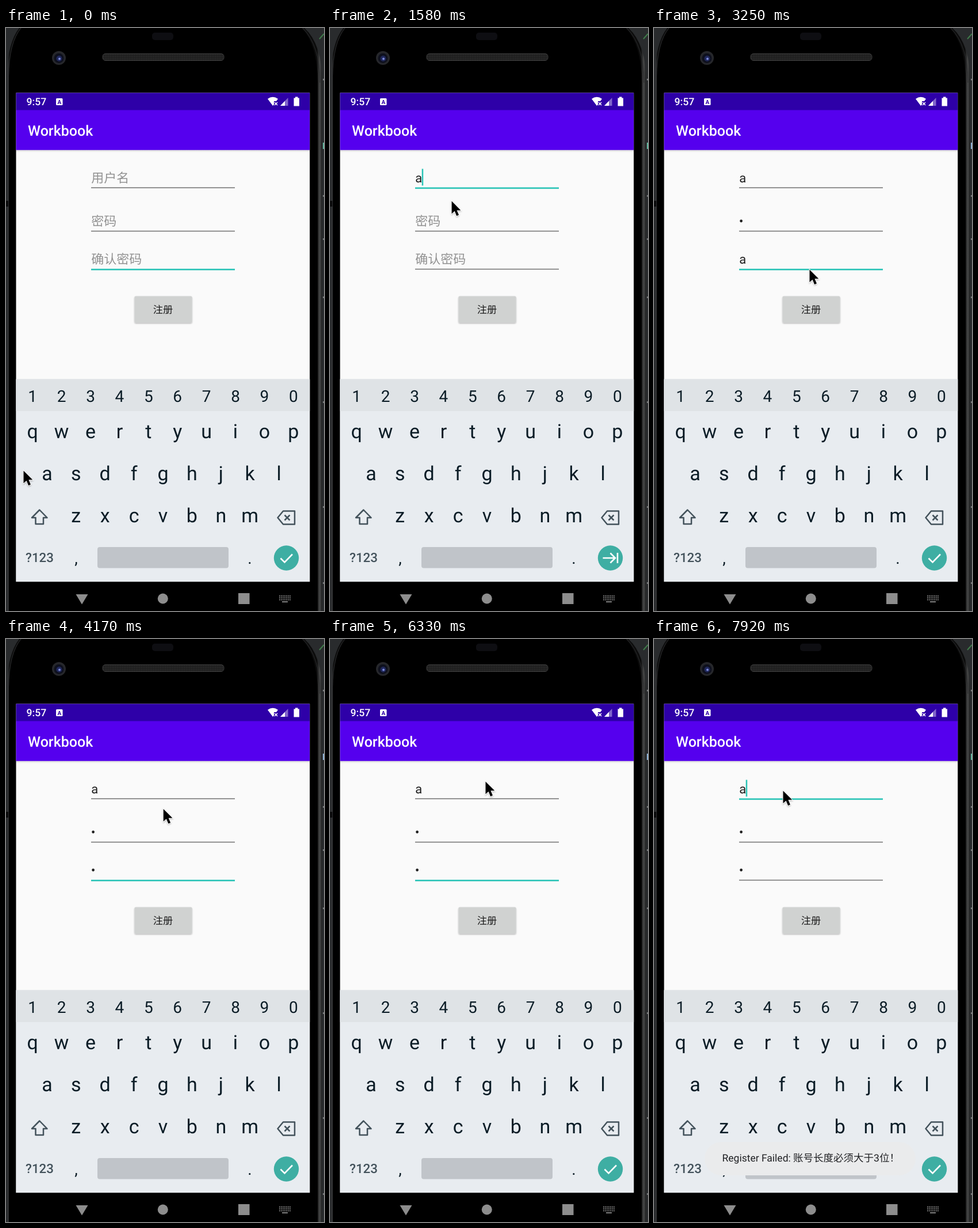
Animation, 553 px wide and 1012 px high, one loop 8 s. Source, as an HTML page:

```html
<!DOCTYPE html>
<html lang="zh-CN">
<head>
<meta charset="utf-8">
<title>Sign-up form</title>
<style>
html, body { margin: 0; width: 100%; height: 100%; overflow: hidden; background: #000; }
svg { display: block; width: 100%; height: 100%; }
text { font-family: Roboto, "Noto Sans CJK SC", "Noto Sans CJK", sans-serif; white-space: pre; text-rendering: geometricPrecision; }
.hint { fill: #929292; font-size: 22px; }
.value { fill: #212121; font-size: 22px; }
.digit { font-size: 28px; }
.letter { font-size: 34px; }
.digit, .letter { fill: #0b1c26; text-anchor: middle; }
.icon { fill: none; stroke: #43525b; stroke-width: 2.5; stroke-linejoin: round; }
.mark { fill: none; stroke: #fff; stroke-width: 2.6; }
</style>
</head>
<body>
<svg viewBox="0 0 553 1012" preserveAspectRatio="none">
  <defs>
    <linearGradient id="rim">
      <stop offset="0" stop-color="#222326"/><stop offset=".004" stop-color="#37383a"/>
      <stop offset=".009" stop-color="#0c0c0c"/><stop offset=".983" stop-color="#0c0c0c"/>
      <stop offset=".992" stop-color="#484949"/><stop offset="1" stop-color="#1c1d1e"/>
    </linearGradient>
    <linearGradient id="barShade" x2="0" y2="1">
      <stop offset="0" stop-color="#000" stop-opacity=".14"/><stop offset="1" stop-color="#000" stop-opacity="0"/>
    </linearGradient>
    <pattern id="mesh" width="3" height="3" patternUnits="userSpaceOnUse">
      <rect width="3" height="3" fill="#1d1d1d"/><circle cx="1.5" cy="1.5" r=".8" fill="#3a3a3a"/>
    </pattern>
    <filter id="soft" x="-30%" y="-30%" width="160%" height="170%">
      <feDropShadow dx="0" dy="1.3" stdDeviation="1.3" flood-opacity=".32"/>
    </filter>
  </defs>

  <!-- phone body -->
  <rect width="553" height="1012" fill="#292b2d"/>
  <path d="M1 1012V85Q3 25 23 0H519Q550 28 550 95V1012z" fill="url(#rim)"/>
  <path d="M5 1012V85Q6 26 27 0H514Q542 28 542 95V1012z" fill="#000"/>
  <path d="M4.500 1012V85Q5 25 26 0M516 0Q546 30 546 95" fill="none" stroke="#2b2c2e"/>
  <path d="M0 300H4V310H0z" fill="#0b0b0c"/>
  <g id="edge"></g>
  <path d="M545 19L553 10" stroke="#3f7c4a" stroke-width="2"/>
  <rect id="tick" x="551" y="199" width="2" height="11"/>

  <rect x="254" y="8" width="37" height="13" rx="5" fill="#0e0e12"/>
  <rect x="168" y="44.500" width="211" height="12" rx="5" fill="url(#mesh)" stroke="#3d3d3d"/>
  <circle cx="92" cy="52" r="12" fill="#26272b"/>
  <circle cx="92" cy="52.500" r="8.500" fill="#0e101d"/>
  <circle cx="92.500" cy="53" r="5" fill="#20285a"/>
  <circle cx="93" cy="53.500" r="2" fill="#7c8bdc"/>

  <!-- status and title bars -->
  <rect x="17.500" y="112.500" width="510.700" height="849" fill="#fafafa"/>
  <rect x="17.500" y="112.500" width="510.700" height="30.500" fill="#2e00a8"/>
  <rect x="17.500" y="142.500" width="510.700" height="69.300" fill="#5500ee"/>
  <rect x="17.500" y="211.800" width="510.700" height="4" fill="url(#barShade)"/>
  <g fill="#fff">
    <text x="35.500" y="134.300" font-size="17.600" font-weight="500">9:57</text>
    <rect x="87" y="122" width="11.500" height="12" rx="1.500"/>
    <text x="92.800" y="131.800" font-size="10" font-weight="700" text-anchor="middle" fill="#2e00a8">A</text>
    <path d="M455 123Q464 116.500 473 123L470 127H466V133L464 135z"/>
    <path d="M467 129L472 134M472 129L467 134" stroke="#fff" stroke-width="1.500"/>
    <path d="M477 135L490.500 121V135z" opacity=".4"/>
    <path d="M477 135L485 126.700V135z"/>
    <path d="M500.500 121.500H503V119.500H507.500V121.500H510V135.500H500.500z"/>
    <text x="38" y="187" font-size="25" font-weight="500">Workbook</text>
  </g>

  <g id="fields"></g>
  <rect id="caret" width="2.500" height="29" fill="#28c3b6"/>
  <rect id="button" x="223.500" y="465.500" width="100" height="46" rx="2" filter="url(#soft)"/>
  <text x="273" y="495" font-size="17.200" fill="#1b1b1b" text-anchor="middle">注册</text>

  <!-- keyboard -->
  <rect x="17.500" y="609.500" width="510.700" height="352" fill="#e8ecf0"/>
  <rect x="17.500" y="609.500" width="510.700" height="55.500" fill="#dfe3e6"/>
  <g id="keys"></g>
  <path class="icon" d="M58.300 836.500L71.500 850H65V861H51.500V850H45z"/>
  <path class="icon" d="M482 838.500H502V861.500H482L472.500 850zM484.500 845.500L493.500 854.500M493.500 845.500L484.500 854.500"/>
  <text x="58.500" y="927" font-size="22.300" font-weight="500" fill="#43525b" text-anchor="middle">?123</text>
  <rect x="159" y="901" width="228" height="36.500" rx="4" fill="#c0c4c9"/>
  <circle cx="487.500" cy="920" r="21.700" fill="#3eaea3"/>
  <path id="done" class="mark" d="M477.500 920.500L484.500 927.500L498 913.500"/>
  <path id="next" class="mark" d="M474.500 920H496M487.500 911.500L496 920L487.500 928.500M500 911V929"/>

  <g id="toast">
    <rect x="88" y="873" width="367" height="58" rx="29" fill="#eaebec"/>
    <text x="118.500" y="907.300" font-size="17.500" fill="#202124">Register Failed: 账号长度必须大于3位！</text>
  </g>

  <!-- navigation bar -->
  <rect x="17" y="961.300" width="512" height="50.700" fill="#000"/>
  <g fill="#8d8d8d">
    <path d="M121.500 983H142.500L132 1000.500z"/>
    <circle cx="272.800" cy="990.500" r="9"/>
    <rect x="404" y="981" width="19.500" height="19"/>
    <g id="dots"></g>
  </g>

  <path id="pointer" d="M0 0V23.500L5.500 18.500L9.300 27.600L13.400 25.800L9.600 17H17z"
    fill="#000" stroke="#fff" stroke-width="1.800" paint-order="stroke" filter="url(#soft)"/>
</svg>
<script>
const LOOP = 8000;
const $ = id => document.getElementById(id);

function add(parent, tag, attrs, label) {
  const node = document.createElementNS("http://www.w3.org/2000/svg", tag);
  for (const key in attrs) node.setAttribute(key, attrs[key]);
  if (label) node.textContent = label;
  return parent.appendChild(node);
}

const show = (node, visible) => node.setAttribute("visibility", visible ? "visible" : "hidden");
const clamp = v => Math.max(0, Math.min(1, v));

// every keyboard row is centred: characters, baseline, class
const PITCH = 50.4;
[["1234567890", 649, "digit"], ["qwertyuiop", 712, "letter"],
 ["asdfghjkl", 785, "letter"], ["zxcvbnm", 858, "letter"]]
  .forEach(([row, y, cls]) => [...row].forEach((c, i) =>
    add($("keys"), "text", { x: 273 + (i - (row.length - 1) / 2) * PITCH, y, class: cls }, c)));
[[",", 122], [".", 424]].forEach(([c, x]) =>
  add($("keys"), "text", { x, y: 930, class: "digit" }, c));

for (let i = 0; i < 21; i++)
  add($("dots"), "rect", { x: 475 + i % 7 * 3, y: 985 + Math.floor(i / 7) * 3.3, width: 1.8, height: 1.8 });
add($("dots"), "rect", { x: 480, y: 995.2, width: 10, height: 1.8 });

[88, 290, 365, 466, 648, 830, 962].forEach(y =>
  add($("edge"), "rect", { x: 551, y, width: 2, height: 3, fill: "#77797a" }));

const fields = [["用户名", 260], ["密码", 335.3], ["确认密码", 401.3]].map(([label, mid]) => {
  const g = $("fields");
  return {
    mid,
    hint: add(g, "text", { x: 148.3, y: mid + 8, class: "hint" }, label),
    value: add(g, "text", { x: 148.3, y: mid + 7.7, class: "value" }, "a"),
    dot: add(g, "circle", { cx: 151.6, cy: mid - .3, r: 2.4, fill: "#212121" }),
    line: add(g, "rect", { x: 148, width: 250 })
  };
});

// pointer stops: time, x, y
const stops = [
  [80, 30, 767], [760, 209, 256], [1400, 209, 256], [1750, 213, 338], [2050, 213, 338],
  [2250, 220, 378], [2500, 220, 392], [2750, 268, 470], [2920, 268, 470], [3250, 270, 418],
  [3670, 273, 335], [3750, 274, 325], [3920, 274, 325], [4500, 272, 246], [5450, 272, 246],
  [5580, 270, 246], [6330, 270, 246], [6560, 274, 478], [6900, 274, 478], [7500, 224, 262]
];

function pointerAt(t) {
  const i = stops.findIndex(s => s[0] > t);
  if (i === 0) return stops[0].slice(1);
  if (i < 0) return stops[stops.length - 1].slice(1);
  const [a, b] = [stops[i - 1], stops[i]];
  const u = (t - a[0]) / (b[0] - a[0]);
  const e = u * u * (3 - 2 * u);
  return [1, 2].map(k => a[k] + (b[k] - a[k]) * e);
}

// focus changes: time, field index
const focusTimes = [[0, 2], [800, 0], [1750, 1], [2330, 2], [7830, 0]];
const caretResets = [-500, 800, 1250, 1750, 2080, 2330, 2420, 7830];
const typedAt = [1250, 2080, 2420];
const maskedAt = [Infinity, 2420, 3920];
const lastBefore = (list, t) => list.filter(v => v <= t).pop();

function draw(t) {
  const focus = focusTimes.filter(f => f[0] <= t).pop()[1];

  fields.forEach((f, i) => {
    const typed = t >= typedAt[i], masked = t >= maskedAt[i], active = i === focus;
    show(f.hint, !typed);
    show(f.value, typed && !masked);
    show(f.dot, masked);
    f.line.setAttribute("y", f.mid + (active ? 16.6 : 16.5));
    f.line.setAttribute("height", active ? 2.6 : 1.6);
    f.line.setAttribute("fill", active ? "#28c3b6" : "#777");
  });

  const caretX = t < typedAt[focus] ? 148.2 : t < maskedAt[focus] ? 159.7 : 154.6;
  $("caret").setAttribute("x", caretX);
  $("caret").setAttribute("y", fields[focus].mid - 15.5);
  show($("caret"), (t - lastBefore(caretResets, t)) % 1000 < 500);

  const next = t >= 920 && t < 2420;
  show($("next"), next);
  show($("done"), !next);

  $("button").setAttribute("fill", t >= 6570 && t < 6760 ? "#bfc2c0" : "#d0d2d1");
  $("toast").setAttribute("opacity", clamp((t - 6600) / 330));
  $("tick").setAttribute("fill", t > 1700 && t < 7200 ? "#8fb4d8" : "#63b8a0");

  const [x, y] = pointerAt(t);
  $("pointer").setAttribute("transform", `translate(${x + .5} ${y + 1.5}) scale(.93)`);
}

const start = performance.now();
function tick(now) {
  draw(Math.max(0, now - start) % LOOP);
  requestAnimationFrame(tick);
}
draw(0);
requestAnimationFrame(tick);
</script>
</body>
</html>
```
